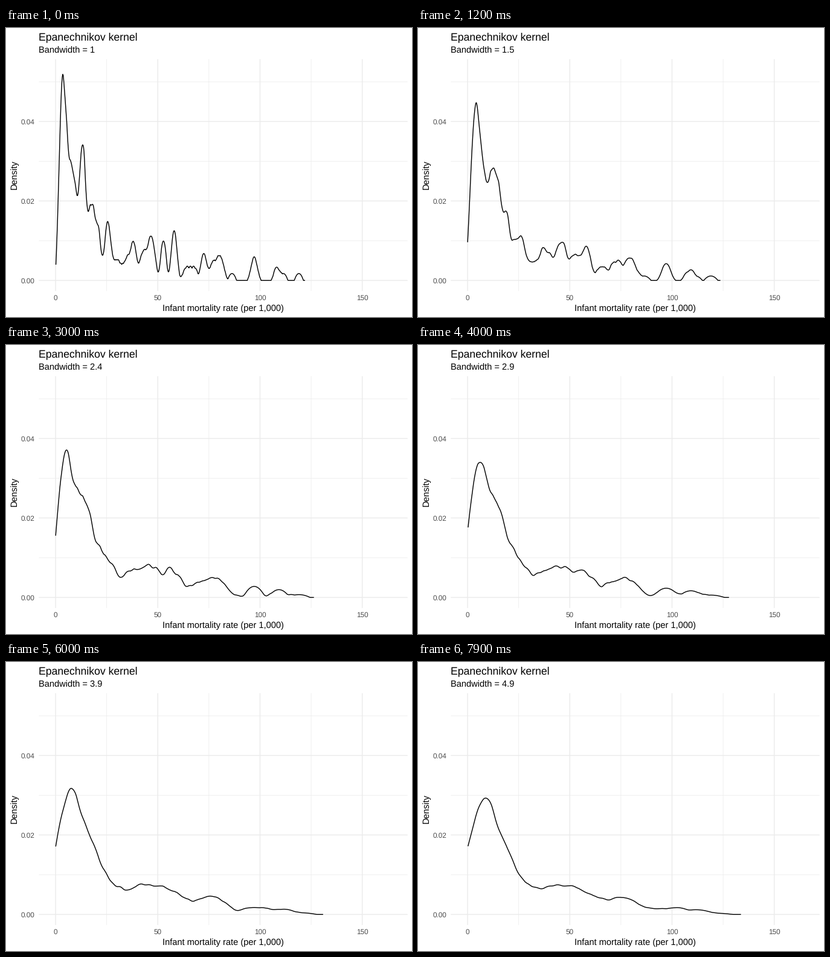
Animation, 672 px wide and 480 px high, one loop 8 s. Source, as a matplotlib script:

```python
import matplotlib.pyplot as plt
import numpy as np
from matplotlib.animation import FuncAnimation

W, H, DPI = 672, 480, 96
FRAMES, INTERVAL = 80, 100
LEFT, RIGHT, TOP, BOTTOM = 54.3, 664.7, 51.8, 436.8
X0, X_UNIT = 82.05, 3.384
Y0, Y_UNIT = 419.3, 6600

plt.rcParams["font.family"] = "Liberation Sans"
plt.rcParams["text.hinting"] = "none"

# The sample: evenly spread groups of rates as (low, high, count).
GROUPS = [
    (1.7, 4.7, 33), (4.8, 7.4, 18), (8, 9.2, 10), (9.5, 11.4, 8),
    (12, 14.5, 21), (15, 15.6, 3), (16.7, 18.4, 11), (19.5, 21.8, 9),
    (24.2, 26.4, 9), (27.1, 32.1, 6), (33.8, 37, 5), (37.8, 39.2, 5),
    (41.8, 43, 4), (44.5, 48.7, 10), (52, 53.5, 6), (56.9, 59.1, 8),
    (62.9, 69, 5), (72, 73, 4), (75.8, 76.3, 2), (77.9, 82.1, 6),
    (86.3, 86.3, 1), (96, 98.3, 4), (107.7, 108.6, 2), (111.4, 111.4, 1),
    (119, 119, 1),
]
RATES = np.concatenate([np.linspace(*g) for g in GROUPS])


def density(bw):
    """Epanechnikov estimate; bw is the kernel's standard deviation."""
    x = np.linspace(RATES.min() - 3 * bw, RATES.max() + 3 * bw, 512)
    x = x[x >= 0]
    half = bw * np.sqrt(5)
    u = (x[:, None] - RATES) / half
    y = np.clip(1 - u**2, 0, None).sum(axis=1)
    return x, 0.75 * y / (half * len(RATES))


def to_px(x, y):
    return X0 + X_UNIT * np.asarray(x), Y0 - Y_UNIT * np.asarray(y)


def px_to_pt(px):
    return px * 72 / DPI


fig = plt.figure(figsize=(W / DPI, H / DPI), dpi=DPI, facecolor="white")
ax = fig.add_axes([0, 0, 1, 1])
ax.set_xlim(0, W)
ax.set_ylim(H, 0)
ax.axis("off")


def label(x, y, s, size, color="black", **kw):
    return ax.text(x, y, s, fontsize=size, color=color, va="baseline", **kw)


def grid(xs, ys, width):
    style = dict(color="#ebebeb", lw=px_to_pt(width), snap=False,
                 solid_capstyle="butt", zorder=1)
    for y in to_px(0, ys)[1]:
        ax.plot([LEFT, RIGHT], [y, y], **style)
    for x in to_px(xs, 0)[0]:
        ax.plot([x, x], [TOP, BOTTOM], **style)


x_ticks = np.arange(0, 151, 50)
y_ticks = np.arange(3) * 0.02
grid(x_ticks[:-1] + 25, y_ticks + 0.01, 0.71)
grid(x_ticks, y_ticks, 1.42)

for v in x_ticks:
    label(X0 + X_UNIT * v, 452, str(v), 8.8, "#4d4d4d", ha="center")
for v in y_ticks:
    label(47.6, Y0 - Y_UNIT * v + 4.4, f"{v:.2f}", 8.8, "#4d4d4d", ha="right")

label(LEFT, 20, "Epanechnikov kernel", 13.2)
subtitle = label(LEFT, 42, "", 11)
label((LEFT + RIGHT) / 2, 470, "Infant mortality rate (per 1,000)", 11,
      ha="center")
label(18, (TOP + BOTTOM) / 2 - 1, "Density", 11, ha="center", rotation=90,
      rotation_mode="anchor")

curve, = ax.plot([], [], color="black", lw=px_to_pt(1.42), snap=False,
                 solid_capstyle="butt", solid_joinstyle="round", zorder=3)


def update(i):
    step = max(0, i - 1)
    curve.set_data(*to_px(*density(1 + 0.05 * step)))
    subtitle.set_text(f"Bandwidth = {1 + step // 2 / 10:g}")
    return curve, subtitle


anim = FuncAnimation(fig, update, frames=FRAMES, interval=INTERVAL,
                     init_func=lambda: update(0), repeat=True)
plt.show()
```
